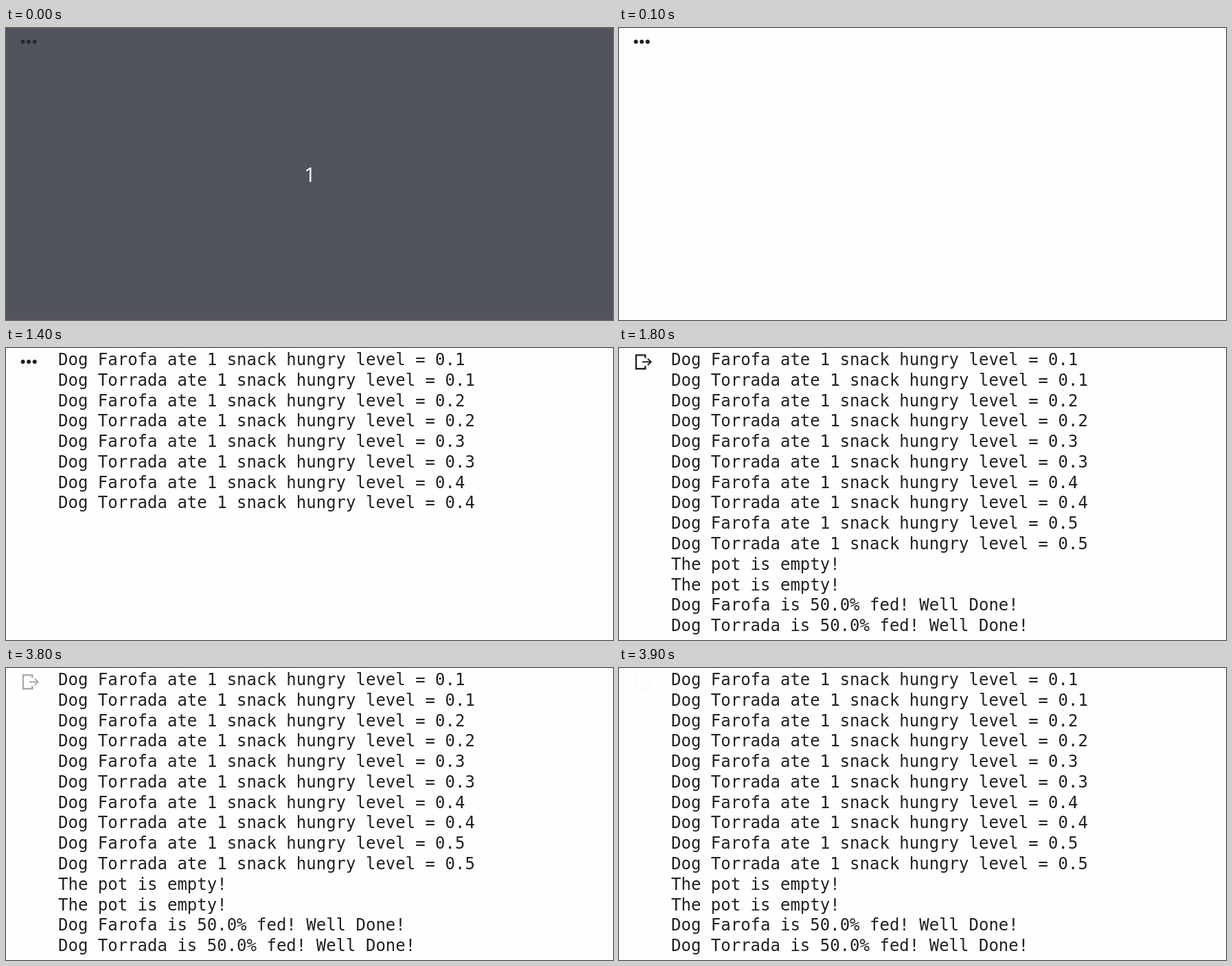
Write an HTML page that moves like this. It is 884 px wide and 425 px high and loops after 4.2 s.

```html
<!DOCTYPE html>
<html lang="en">
<head>
<meta charset="utf-8">
<title>Dog snacks</title>
<style>
html, body { margin: 0; width: 100%; height: 100%; overflow: hidden; background: #fefefe; }
svg { display: block; width: 884px; height: 425px; }
#log { font: 24px "DejaVu Sans Mono", monospace; fill: #212121; white-space: pre; }
#count { font: 30px "Open Sans", "Noto Sans", sans-serif; fill: #fff; text-anchor: middle; }
</style>
</head>
<body>
<svg viewBox="0 0 884 425">
  <rect width="884" height="425" fill="#fefefe"/>
  <g id="intro">
    <rect width="884" height="425" fill="#51545c"/>
    <rect y="421" width="884" height="4" fill="#57535a"/>
    <text id="count" x="442.5" y="224">1</text>
  </g>
  <g id="dots">
    <circle cx="24.6" cy="20" r="3"/>
    <circle cx="33.1" cy="20" r="3"/>
    <circle cx="41.7" cy="20" r="3"/>
  </g>
  <g id="exit" fill="none" stroke="#212121">
    <path d="M38.3 14.5V10.4H24.9V30.3H38.3V26" stroke-width="2.4"/>
    <path d="M34 20.2H46.5M41.7 15.4L46.6 20.2L41.7 25" stroke-width="1.9"/>
  </g>
  <g id="log"></g>
</svg>
<script>
const LOOP = 4200;
const DOGS = ["Farofa", "Torrada"];
const $ = id => document.getElementById(id);

const lines = [];
for (let n = 1; n <= 5; n++)
  for (const dog of DOGS) lines.push(`Dog ${dog} ate 1 snack hungry level = 0.${n}`);
for (const _ of DOGS) lines.push("The pot is empty!");
for (const dog of DOGS) lines.push(`Dog ${dog} is 50.0% fed! Well Done!`);

const rows = lines.map((line, i) => {
  const row = document.createElementNS("http://www.w3.org/2000/svg", "text");
  row.setAttribute("x", 76);
  row.setAttribute("y", 25 + Math.round(i * 29.78));
  row.textContent = line;
  $("log").appendChild(row);
  return row;
});

// Each entry: [start time, value]; the last one reached applies.
const printed = [[0, 0], [800, 4], [1100, 6], [1400, 8], [1800, 14]];
const iconAlpha = [[0, 0], [1800, 1], [3700, 0.76], [3800, 0.38], [3900, 0.015]];
const at = (steps, t) => steps.filter(s => s[0] <= t).pop()[1];
const show = (el, on) => el.setAttribute("visibility", on ? "visible" : "hidden");

function draw(t) {
  const dim = t < 100, count = at(printed, t);
  show($("intro"), dim);
  show($("dots"), t < 1800);
  $("dots").setAttribute("fill", dim ? "#262930" : "#212121");
  $("exit").setAttribute("opacity", at(iconAlpha, t));
  rows.forEach((row, i) => show(row, i < count));
}

const start = performance.now();
function tick() {
  draw((performance.now() - start) % LOOP);
  requestAnimationFrame(tick);
}
tick();
</script>
</body>
</html>
```
